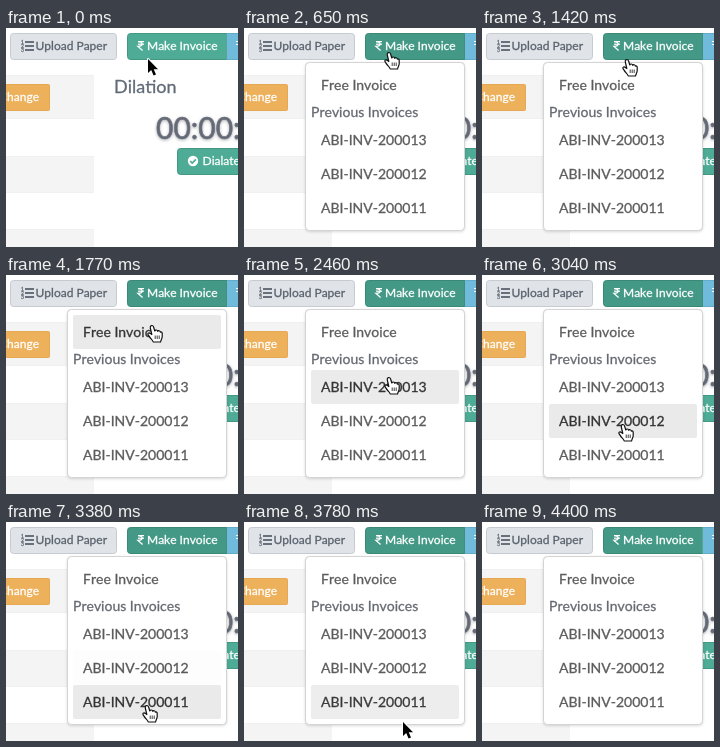
These frames come from a looping animation (232x219 px, 4.5 s). An HTML page with a canvas:

```html
<!DOCTYPE html>
<html lang="en">
<head>
<meta charset="utf-8">
<title>Invoice menu</title>
<style>
  html, body { margin: 0; width: 100%; height: 100%; overflow: hidden; background: #fff; }
  canvas { display: block; }
</style>
</head>
<body>
<canvas id="stage" width="232" height="219"></canvas>
<script>
const ctx = document.getElementById('stage').getContext('2d');
const LOOP = 4500;
const FONT = 'Lato, "Open Sans", sans-serif';
const TEAL = [77, 171, 150], TEAL_DARK = [67, 153, 134];

// Screen updates happen in bursts: [first, last, number of updates].
const bursts = [
  [0, 0, 1], [60, 170, 3], [650, 650, 1], [1360, 1770, 8], [2060, 2570, 10],
  [2630, 3150, 10], [3210, 3730, 10], [3780, 4020, 5], [4400, 4400, 1]
];

// Pointer tip: [time, x, y].
const path = [
  [0, 142, 31], [60, 144, 28], [170, 146, 24], [1300, 146, 24], [1770, 147, 50],
  [2005, 147, 50], [2460, 146, 102], [2570, 145, 110], [3040, 142, 149],
  [3150, 141, 157], [3380, 142, 183], [3730, 152, 195], [4020, 190, 222]
];

const items = [
  { text: 'Free Invoice', top: 40, enter: 1590, leave: 2190 },
  { text: 'ABI-INV-200013', top: 95, enter: 2370, leave: 2790 },
  { text: 'ABI-INV-200012', top: 129, enter: 2790, leave: 3205 },
  { text: 'ABI-INV-200011', top: 163, enter: 3205, leave: 3750 }
];

const clamp = v => Math.max(0, Math.min(1, v));
const ramp = (t, start, length) => clamp((t - start) / length);
const mix = (a, b, k) => `rgb(${a.map((v, i) => Math.round(v + (b[i] - v) * k))})`;
const gray = v => `rgb(${v},${v},${v})`;

function snap(t) {
  const [first, last, count] = bursts.filter(b => b[0] <= t).pop();
  if (count === 1 || t >= last) return last;
  const step = (last - first) / (count - 1);
  return first + Math.floor((t - first + 6) / step) * step;
}

function pointerAt(t) {
  const i = path.findIndex(p => p[0] > t);
  if (i < 0) return path[path.length - 1].slice(1);
  const [t0, x0, y0] = path[i - 1], [t1, x1, y1] = path[i];
  const k = (t - t0) / (t1 - t0);
  return [x0 + (x1 - x0) * k, y0 + (y1 - y0) * k];
}

function rect(x, y, w, h, color) {
  ctx.fillStyle = color;
  ctx.fillRect(x, y, w, h);
}

function box(x, y, w, h, radius, fill, border) {
  ctx.beginPath();
  ctx.roundRect(x + 0.5, y + 0.5, w - 1, h - 1, radius);
  ctx.fillStyle = fill;
  ctx.fill();
  ctx.lineWidth = 1;
  ctx.strokeStyle = border;
  ctx.stroke();
}

function label(text, x, y, size, color, bold = 0.3) {
  ctx.font = `${size}px ${FONT}`;
  ctx.fontKerning = 'none';
  ctx.fillStyle = ctx.strokeStyle = color;
  ctx.lineWidth = bold;
  ctx.fillText(text, x, y);
  ctx.strokeText(text, x, y);
}

function line(points, color, width) {
  ctx.beginPath();
  points.forEach(([x, y]) => ctx.lineTo(x, y));
  ctx.strokeStyle = color;
  ctx.lineWidth = width;
  ctx.stroke();
}

function rupee(x, y) {
  line([[x, y + 0.6], [x + 6, y + 0.6]], '#fff', 1.2);
  line([[x, y + 3.2], [x + 6, y + 3.2]], '#fff', 1.2);
  ctx.beginPath();
  ctx.moveTo(x, y + 0.6);
  ctx.bezierCurveTo(x + 5.5, y + 0.2, x + 5.5, y + 5.4, x, y + 5.4);
  ctx.lineTo(x + 4.6, y + 9.4);
  ctx.lineWidth = 1.3;
  ctx.stroke();
}

function listIcon(x, y) {
  for (let i = 0; i < 3; i++) {
    rect(x + 4, y + 1 + i * 4, 9, 2, '#68717b');
    label(String(i + 1), x, y + 4 + i * 4, 5, '#68717b');
  }
}

function checkIcon(x, y) {
  ctx.beginPath();
  ctx.arc(x, y, 5.2, 0, 7);
  ctx.fillStyle = '#fff';
  ctx.fill();
  line([[x - 2.8, y], [x - 0.8, y + 2], [x + 2.9, y - 1.7]], `rgb(${TEAL})`, 1.7);
}

function drawPage(t) {
  rect(0, 0, 232, 219, '#fff');
  [[47, 44], [128, 37], [201, 18]].forEach(([y, h]) => rect(0, y, 88, h, '#f4f4f4'));
  [47, 90, 128, 164, 201].forEach(y => rect(0, y, 88, 1, '#f0f0f0'));

  box(-20, 56, 64, 27, 1, '#edb05b', '#e6a853');
  ctx.textAlign = 'right';
  label('Change', 33, 73, 12, '#fff');
  ctx.textAlign = 'left';

  box(4, 5, 107, 27, 3, '#e0e4e8', '#c6cbd1');
  listIcon(15, 12);
  label('Upload Paper', 29.5, 22, 12, '#59626d');

  const hover = ramp(t, 0, 170);
  const edge = t >= 60 && t < 4400 ? '#3f8f7c' : '#55a693';
  box(121, 5, 106, 27, 3, mix(TEAL, TEAL_DARK, hover), mix([67, 152, 133], [58, 137, 119], hover));
  rect(220, 5, 1, 27, edge);
  rupee(132, 13);
  label('Make Invoice', 141, 22, 12, '#fff');
  rect(221, 5, 11, 27, '#70bbdb');
  rect(221, 5, 11, 1, '#62abc9');
  rect(221, 31, 11, 1, '#62abc9');
  rect(230, 13, 2, 1, '#fff');
  rect(230, 16, 2, 1, '#fff');

  label('Dilation', 108, 65, 18, '#626b78');
  ctx.shadowColor = 'rgba(70,75,85,.4)';
  ctx.shadowBlur = 3;
  ctx.shadowOffsetY = 1;
  label('00:00:', 150, 111, 30, '#686e7a', 0.6);
  ctx.shadowColor = 'transparent';

  box(171, 120, 80, 27, 3, `rgb(${TEAL})`, '#439885');
  checkIcon(187, 133);
  label('Dialate', 196.5, 137, 12, '#fff');
}

function drawMenu(t) {
  ctx.shadowColor = 'rgba(0,0,0,.12)';
  ctx.shadowBlur = 3;
  ctx.shadowOffsetY = 1;
  box(61, 34, 160, 169, 4, '#fff', '#d4d4d5');
  ctx.shadowColor = 'transparent';
  box(61, 34, 160, 169, 4, '#fff', '#d4d4d5');

  for (const { text, top, enter, leave } of items) {
    const glow = ramp(t, enter, 90) - ramp(t, leave, 200);
    if (glow > 0) {
      ctx.beginPath();
      ctx.roundRect(67, top, 148, 34, 2);
      ctx.fillStyle = gray(Math.round(255 - 21 * glow));
      ctx.fill();
    }
    label(text, 77, top + 22, 14, gray(Math.round(92 - 40 * glow)));
  }
  label('Previous Invoices', 67, 89, 14, '#646870');
}

function drawArrow() {
  ctx.beginPath();
  [[0, 0], [0, 14], [3.2, 11], [5.6, 16.5], [8, 15.4], [5.7, 10.2], [10, 10.2]]
    .forEach(([x, y]) => ctx.lineTo(x, y));
  ctx.closePath();
  ctx.strokeStyle = '#fff';
  ctx.lineWidth = 2;
  ctx.stroke();
  ctx.fillStyle = '#000';
  ctx.fill();
}

const hand = new Path2D(
  'M-1.2 9.5L-2.7 3C-3.2 .3-.3-.4 .6 2L1.8 6C2.2 4.6 4.4 4.6 4.8 6.4' +
  'C5.2 5.2 7.2 5.6 7.4 7.2C8 6.4 9.2 7 9.2 8.6V11.6C9.2 14 7.8 14.8 7.6 17H.2' +
  'C-.2 14.8-2.6 13.6-3.8 11.4L-5 9.6C-5.6 8-3.6 7.4-2.6 8.6Z'
);

function drawHand() {
  ctx.fill(hand);
  ctx.lineWidth = 1.2;
  ctx.stroke(hand);
  [2.2, 4.2, 6.2].forEach(x => line([[x, 10.5], [x, 14]], '#111', 0.8));
}

function drawPointer(t) {
  const [x, y] = pointerAt(t);
  if (y > 219) return;
  ctx.save();
  ctx.translate(Math.round(x), Math.round(y));
  ctx.lineJoin = 'round';
  ctx.fillStyle = '#fff';
  ctx.strokeStyle = '#111';
  if (t < 60 || y > 197) drawArrow();
  else drawHand();
  ctx.restore();
}

function render(now) {
  const t = snap(now % LOOP);
  drawPage(t);
  if (t >= 650) drawMenu(t);
  drawPointer(t);
}

const start = performance.now();
function tick() {
  render(performance.now() - start);
  requestAnimationFrame(tick);
}
tick();
</script>
</body>
</html>
```
